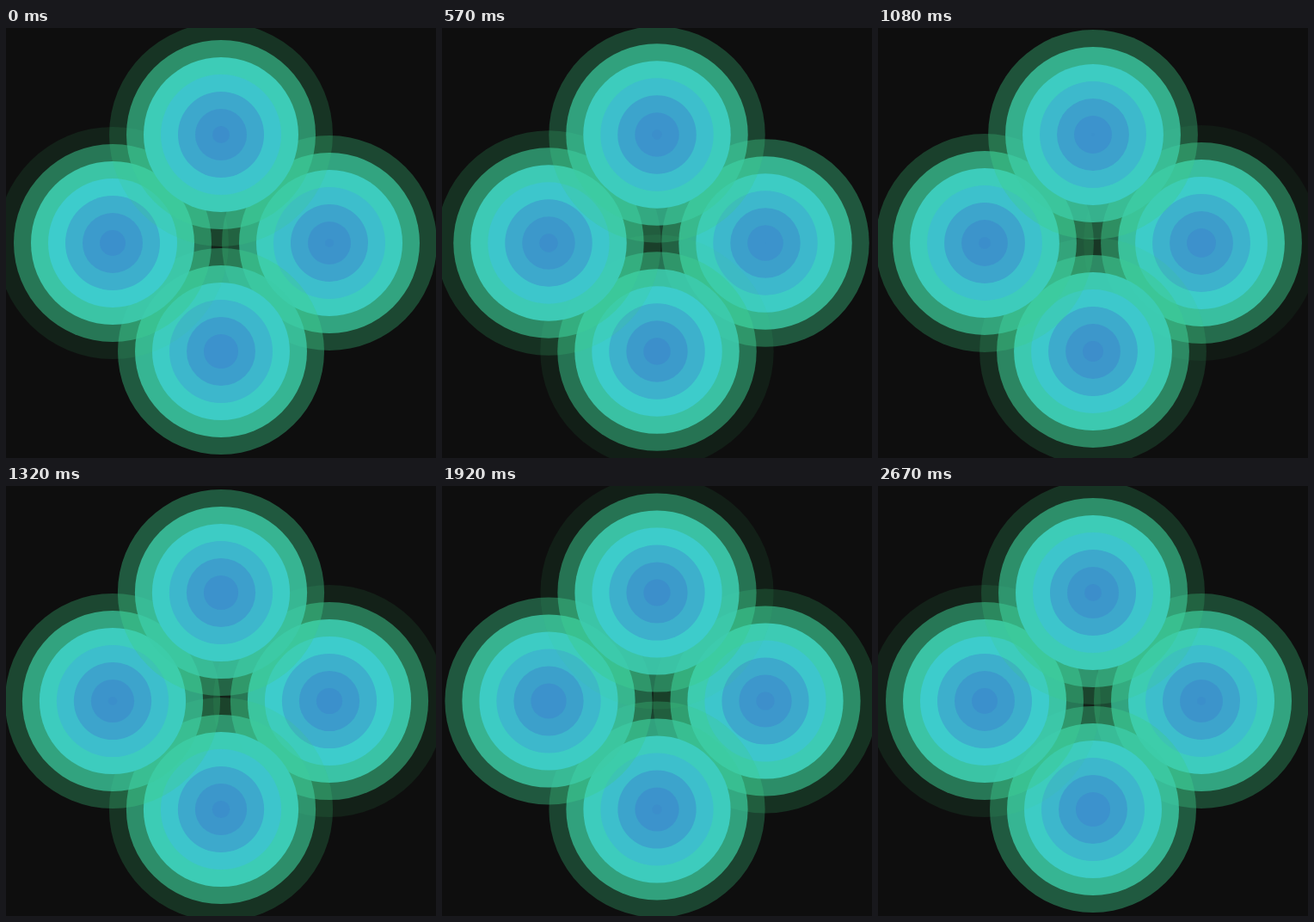
An HTML page for the animation above (2.7 s loop, 500 px wide and 500 px high).

```html
<!DOCTYPE html>
<html lang="en">
<head>
<meta charset="utf-8">
<title>Pulsing rings</title>
<style>
  html, body { margin: 0; width: 100%; height: 100%; overflow: hidden; background: #0e0e0e; }
  svg { display: block; width: 100%; height: 100%; }
</style>
</head>
<body>
<svg id="stage" viewBox="0 0 500 500"></svg>
<script>
const NS = 'http://www.w3.org/2000/svg';
const STEP = 30, STEPS = 90;
const GAP = 20, MAX = 140, FADE = 50, RINGS = MAX / GAP;
const ORBIT = 126;

const stage = document.getElementById('stage');

// Four groups around the centre: right, bottom, left, top.
const groups = [0, 1, 2, 3].map(i => {
  const angle = i * Math.PI / 2;
  const rings = [];
  for (let k = 0; k < RINGS; k++) {
    const c = document.createElementNS(NS, 'circle');
    c.setAttribute('cx', 250 + ORBIT * Math.cos(angle));
    c.setAttribute('cy', 250 + ORBIT * Math.sin(angle));
    stage.appendChild(c);
    rings.push(c);
  }
  return rings;
});

const mod = (a, n) => ((a % n) + n) % n;
const hue = r => 180 + 0.6 * (75 - r);
const alpha = r => Math.max(0, Math.min(1, r / FADE, (MAX - r) / FADE));

function draw(ms) {
  const p = Math.floor(ms / STEP) % STEPS / (STEPS - 1);
  groups.forEach((rings, i) => {
    const inner = mod(5 - 5 * i - GAP * p, GAP);
    rings.forEach((c, k) => {
      const r = inner + GAP * (RINGS - 1 - k);
      c.setAttribute('r', r.toFixed(3));
      c.setAttribute('fill', `hsl(${hue(r).toFixed(2)}, 58.4%, 52%)`);
      c.setAttribute('fill-opacity', alpha(r).toFixed(4));
    });
  });
}

const start = performance.now();
function tick() {
  draw(performance.now() - start);
  requestAnimationFrame(tick);
}
draw(0);
requestAnimationFrame(tick);
</script>
</body>
</html>
```
